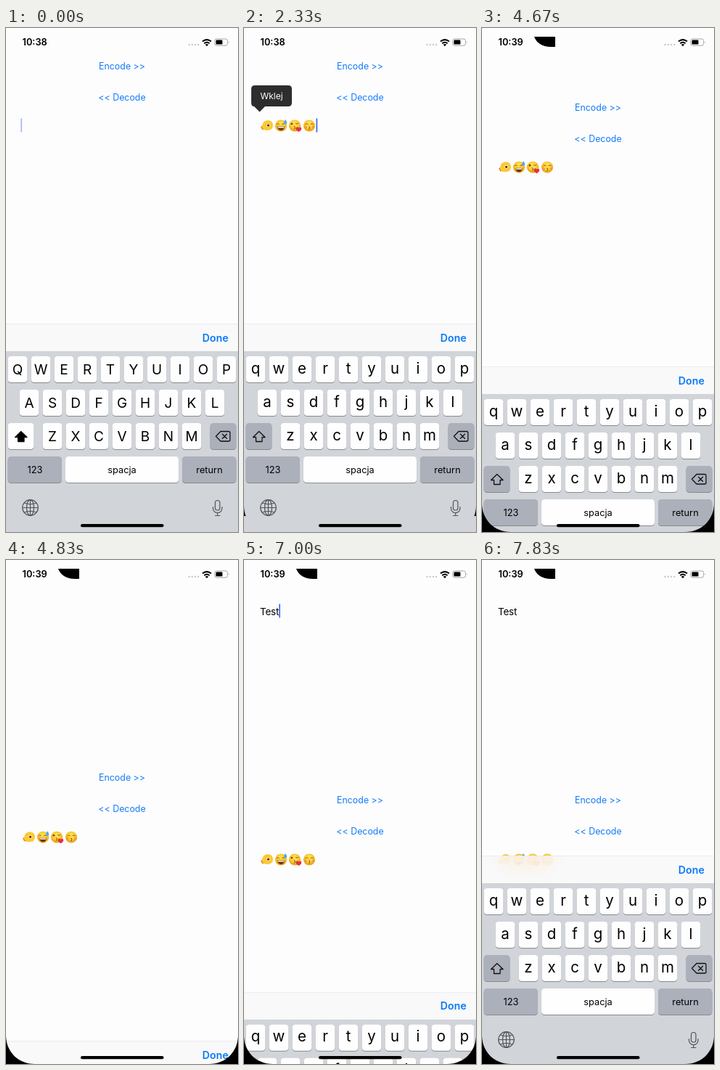
An HTML page for the animation above (8 s loop, 320 px wide and 694 px high).

```html
<!DOCTYPE html>
<html lang="pl">
<head>
<meta charset="utf-8">
<title>Emoji encoder</title>
<style>
html, body { margin: 0; width: 100%; height: 100%; overflow: hidden; background: #fdfdfe; }
svg { display: block; width: 100vw; height: 100vh; font-family: Inter, Roboto, sans-serif; }
.link { fill: #147bf8; font-size: 12.4px; text-anchor: middle; }
.key { text-anchor: middle; font-size: 19px; }
.small { text-anchor: middle; font-size: 12.8px; }
.line { fill: none; stroke: #111; stroke-width: 1.3; stroke-linejoin: round; stroke-linecap: round; }
.tool { fill: none; stroke: #50555c; stroke-width: 1.2; stroke-linecap: round; }
</style>
</head>
<body>
<svg viewBox="0 0 320 694" preserveAspectRatio="none">
  <defs>
    <clipPath id="bar"><rect y="407" width="320" height="38"/></clipPath>
    <filter id="blur" x="-50%" y="-100%" width="200%" height="300%"><feGaussianBlur stdDeviation="9"/></filter>
    <radialGradient id="face" cy=".4"><stop offset=".5" stop-color="#ffdc45"/><stop offset="1" stop-color="#f0a818"/></radialGradient>
  </defs>
  <rect width="320" height="694" fill="#fdfdfe"/>

  <g id="page">
    <text class="link" x="160" y="56.800">Encode &gt;&gt;</text>
    <text class="link" id="decode" x="160" y="99.800">&lt;&lt; Decode</text>
    <g id="emoji">
      <path d="M23 136l5-3 2 7-5 0z" fill="#e8871c"/>
      <path d="M25 137Q25 127 33 127Q40 128 40 134Q40 141 32 141Q27 141 25 137z" fill="#fbc936"/>
      <circle cx="33.500" cy="134" r="2.300" fill="#fff0bc"/><circle cx="33.500" cy="134" r="1.500" fill="#3a2108"/>
      <g fill="url(#face)"><circle cx="51" cy="134.500" r="8"/><circle cx="70" cy="134.500" r="8"/><circle cx="90" cy="134.500" r="8"/></g>
      <path d="M46 135.500h10Q55 141 51 141Q47 141 46 135.500z" fill="#6b3510"/>
      <path d="M46.600 136h8.800l-.6 1.600h-7.600z" fill="#fff"/>
      <path d="M57 126q3.500 4 1.500 6q-2 1.500-3.500-.5q-.5-2 2-5.500z" fill="#4fa9e8"/>
      <g fill="none" stroke="#7a4313" stroke-width=".9" stroke-linecap="round">
        <path d="M45.500 132.500q1.500-2 3 0M52.500 132.500q1.500-2 3 0M71.500 131.500q1.700 1.600 3.400 0M69 135.500q2.500.2 1 1.700q1.500 1.500-1 2M85 132.500q1.700-2 3.400 0M92 132.500q1.700-2 3.400 0M89.500 136q2.500.2 1 1.600q1.500 1.300-1 1.800"/>
      </g>
      <circle cx="66" cy="132" r="1.300" fill="#6b3510"/>
      <path d="M75.500 143q-5.500-3-3.700-6q2-1.800 3.700.5q2.200-2 3.600.2q1 2.800-3.600 5.300z" fill="#e23440"/>
      <g fill="#f58a4a" opacity=".7"><circle cx="85" cy="136.500" r="1.900"/><circle cx="95.500" cy="136.500" r="1.900"/></g>
    </g>
    <rect id="caret" y="124.500" width="1.800" height="19" fill="#426bf2"/>
    <g id="menu">
      <path d="M15 79H61Q66 79 66 84V103Q66 108 61 108H29L21.500 115.500L14 108Q10 108 10 103V84Q10 79 15 79z" fill="#222"/>
      <text x="38" y="98" font-size="12" text-anchor="middle" fill="#fff">Wklej</text>
    </g>
  </g>

  <g id="result">
    <text x="22" y="75.500" font-size="13.400" letter-spacing="-.15">Test</text>
    <rect id="topCaret" x="48.300" y="60.500" width="1.700" height="19" fill="#426bf2"/>
  </g>

  <g id="board">
    <rect y="407" width="320" height="38" fill="#f9f9fa" opacity=".93"/>
    <path d="M0 407.500H320" stroke="#ececf2"/>
    <g clip-path="url(#bar)"><ellipse id="glow" cx="62" rx="44" ry="16" fill="#ffd9a0" filter="url(#blur)"/></g>
    <text id="done" x="306.800" y="431.500" font-size="14.200" font-weight="600" text-anchor="end" fill="#0a7af8">Done</text>
    <rect y="445" width="320" height="260" fill="#d1d4d9"/>
    <g id="keys"></g>
    <path id="shift" class="line" d="M20.700 555.500L29 563.500H25V569.500H16.500V563.500H12.500z"/>
    <path class="line" d="M296 555.500H307Q309 555.500 309 557.500V567Q309 569 307 569H296L289.500 562.300zM298.500 559.200l6 6m0-6l-6 6"/>
    <g class="small"><text x="40" y="613">123</text><text x="160" y="613">spacja</text><text x="280.500" y="613">return</text></g>
    <g class="tool">
      <circle cx="33.500" cy="660.500" r="10.800"/><ellipse cx="33.500" cy="660.500" rx="5" ry="10.800"/>
      <path d="M33.500 650V671M23 660.500H44M25.500 654q8 3.500 16 0M25.500 667q8-3.500 16 0"/>
      <rect x="288.500" y="650.500" width="6.500" height="13.500" rx="3.250"/>
      <path d="M285.500 659.500v2q.5 6 6.250 6t6.250-6v-2M291.750 667.500v4M288.500 671.500h6.500"/>
    </g>
  </g>

  <path id="sliver" d="M0 657Q0 666 2.500 672H0zM320 657Q320 666 317.500 672H320z"/>
  <path id="corners" d="M0 655C0 676 16 694 40 694H0zM320 655C320 676 304 694 280 694H320z"/>
  <rect x="103" y="683" width="114.500" height="4.300" rx="2.150"/>

  <text id="clock" x="22.500" y="24.300" font-size="12.800" font-weight="600"></text>
  <path id="notch" d="M72 12H101V26H95Q77 25.500 72 12z"/>
  <g fill="#c9c9c6"><circle cx="252.500" cy="23" r="1.200"/><circle cx="256.800" cy="23" r="1.200"/><circle cx="261" cy="23" r="1.200"/><circle cx="265.200" cy="23" r="1.200"/></g>
  <g fill="none" stroke="#000" stroke-width="2"><path d="M271 18.600q6-5 12 0M273.300 21.300q3.700-3 7.400 0"/></g>
  <path d="M277 25.200l-2.200-2.400q2.200-1.600 4.400 0z"/>
  <rect x="287.900" y="15" width="17.700" height="9.200" rx="2.600" fill="none" stroke="#a6a6a4"/>
  <path d="M307 18q1.600 1.600 0 3.200z" fill="#a6a6a4"/>
  <rect x="289.500" y="16.600" width="9" height="6" rx="1.200"/>
</svg>
<script>
const LOOP = 8000, PASTE = 2320, CLOCK = 2820, HIDE = 4625, DECODED = 6820, SHOW = 6934;
const BOARD = 287, SCROLL = 278;
const $ = id => document.getElementById(id);
const clamp = v => Math.max(0, Math.min(1, v));
const keys = $('keys'), letters = [];

function add(tag, attrs) {
  const el = document.createElementNS('http://www.w3.org/2000/svg', tag);
  for (const name in attrs) el.setAttribute(name, attrs[name]);
  return keys.appendChild(el);
}
function key(x, y, width, fill = '#fefefe') {
  const box = { x, width, height: 36, rx: 4.3 };
  add('rect', { ...box, y: y + 1, fill: '#898a8d' });
  return add('rect', { ...box, y, fill });
}

['qwertyuiop', 'asdfghjkl', 'zxcvbnm'].forEach((row, r) => {
  [...row].forEach((char, i) => {
    const x = [2.6, 18.6, 50.6][r] + i * 32, y = 452 + r * 46;
    key(x, y, 26.8);
    letters.push({ char, y, el: add('text', { x: x + 13.4, class: 'key' }) });
  });
});
const GREY = '#abb0ba';
const shiftKey = key(2.6, 544, 35.8);
key(281.6, 544, 35.8, GREY);
key(2.6, 590, 74.4, GREY);
key(82, 590, 156);
key(243, 590, 74.4, GREY);

function setCase(upper) {
  for (const { char, y, el } of letters) {
    el.textContent = upper ? char.toUpperCase() : char;
    el.setAttribute('y', y + (upper ? 25 : 23.5));
    el.style.fontSize = upper ? '19px' : '20.5px';
  }
  shiftKey.setAttribute('fill', upper ? '#fefefe' : GREY);
  $('shift').style.fill = upper ? '#000' : 'none';
}

// Critically damped spring, as used for the keyboard
function spring(ms) {
  const x = Math.max(0, ms) * 0.018257;
  return 1 - (1 + x) * Math.exp(-x);
}
// Caret: fades out around 0, back in around 500
function blink(ms) {
  const p = ((ms % 1000) + 1000) % 1000;
  return p < 500 ? clamp(0.45 - p / 200) + clamp((p - 400) / 200)
    : p < 900 ? clamp((p - 400) / 200) : 1 - (p - 900) / 182;
}
const move = (id, y) => $(id).setAttribute('transform', `translate(0 ${y})`);
const fade = (id, v) => { $(id).style.opacity = +v; };

let wasUpper;
function draw(t) {
  const upper = t < PASTE, scroll = SCROLL * spring(t - HIDE);
  const drop = BOARD * (t < SHOW ? spring(t - HIDE) : 1 - spring(t - SHOW));
  if (upper !== wasUpper) setCase(wasUpper = upper);

  move('page', scroll);
  move('board', drop);
  $('glow').setAttribute('cy', 134 + scroll - drop);
  fade('glow', upper ? 0 : 0.22);
  fade('emoji', !upper);
  fade('menu', clamp((t - 1665) / 160) * clamp(1 - (t - PASTE) / 200));
  $('caret').setAttribute('x', upper ? 20.3 : 99.5);
  fade('caret', t > HIDE ? 0 : upper ? blink(t) : t < 2800 ? 1 : blink(t + 330));
  fade('decode', t > 6650 && t < DECODED ? 0.3 : 1);
  fade('done', t > 4400 && t < HIDE ? 0.3 : 1);
  fade('result', t >= DECODED);
  fade('topCaret', t < 7400 ? 1 : blink(t + 430));
  fade('sliver', !upper);
  fade('corners', t >= HIDE);
  fade('notch', t >= CLOCK);
  $('clock').textContent = t < CLOCK ? '10:38' : '10:39';
}

const start = performance.now();
function frame() {
  draw((performance.now() - start) % LOOP);
  requestAnimationFrame(frame);
}
frame();
</script>
</body>
</html>
```
